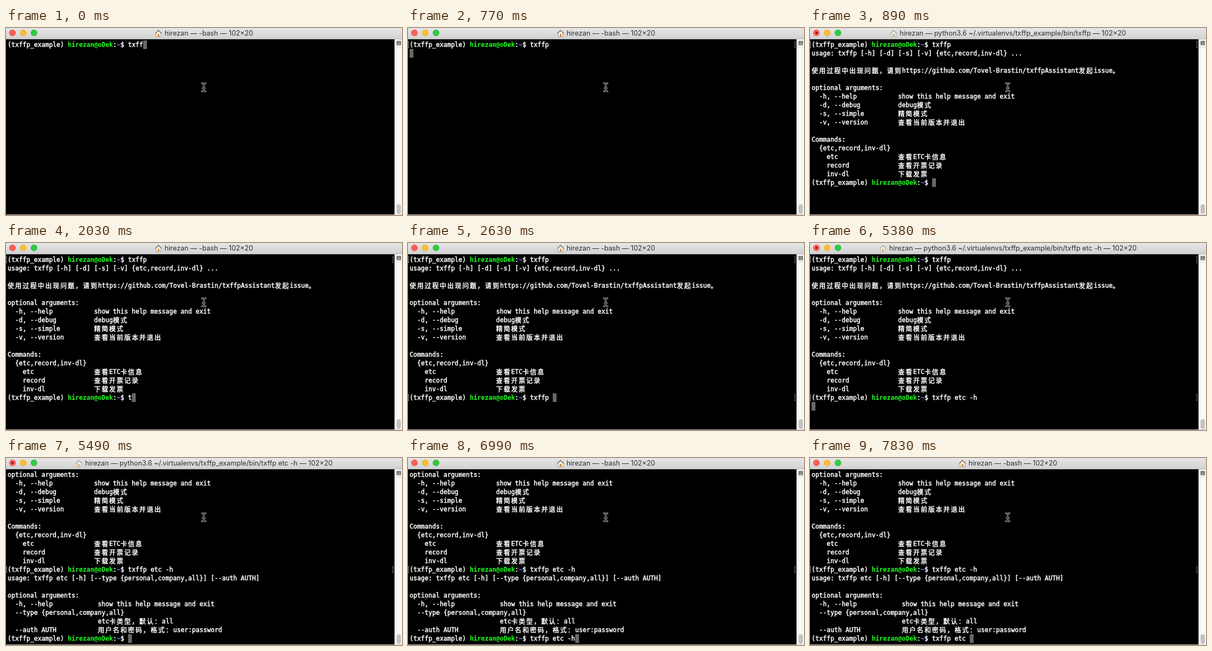
Animation, 736 px wide and 347 px high, one loop 8 s. Source, as an HTML page:

```html
<!DOCTYPE html>
<html lang="en">
<head>
<meta charset="utf-8">
<title>Terminal</title>
<style>
  html, body { margin: 0; width: 100%; height: 100%; overflow: hidden; background: #000; }
  #stage { position: relative; width: 736px; height: 347px; overflow: hidden; background: #000; }
  #stage > * { position: absolute; }
  #bar {
    left: 0; top: 0; width: 736px; height: 21px; box-sizing: border-box;
    background: linear-gradient(#e6e6e6, #d2d2d2); border-bottom: 1px solid #b4b4b4;
    display: flex; justify-content: center; align-items: center;
    font: 12.75px/18px Inter, "Open Sans", sans-serif; color: #303030; white-space: pre;
  }
  #bar svg { margin-right: 5px; }
  #screen {
    left: 0; top: 23px; width: 722px;
    font: 11.627px/16px "DejaVu Sans Mono", monospace; font-variant-ligatures: none;
    color: #fff; -webkit-text-stroke: .5px; white-space: pre;
  }
  .row { position: relative; height: 16px; padding-left: 3px; }
  .row i {
    display: inline-block; width: 14px; height: 16px; vertical-align: top;
    font: 12px/16px "Noto Sans CJK SC", "Noto Sans CJK", sans-serif;
  }
  .row b { color: #20f820; -webkit-text-stroke: .1px; }
  .row b.path { color: #7079ff; }
  .mark::before, .mark::after {
    content: ""; position: absolute; top: 2px; width: 1px; height: 10px; border: 1px solid #8c8c8c;
  }
  .mark::before { left: 0; border-right: 0; }
  .mark::after { left: 718px; border-left: 0; }
  .cursor { display: inline-block; width: 7px; height: 16px; background: #686868; vertical-align: top; }
</style>
</head>
<body>
<div id="stage">
  <div id="bar">
    <svg id="home" width="13" height="14" viewBox="0 0 13 14">
      <path d="M2 6.5 6.5 2 11 6.5V13H2Z" fill="#fbf7ef" stroke="#a39380"/>
      <path d="M.5 7.2 6.5 1.2 12.5 7.2" fill="none" stroke="#8a6a4c" stroke-width="1.4"/>
      <path d="M5 8h3v5H5Z" fill="#d98a35"/>
    </svg><span id="title"></span>
  </div>
  <div id="screen"></div>
  <svg width="736" height="347" viewBox="0 0 736 347">
    <g stroke-width=".6">
      <circle cx="12" cy="9" r="5.8" fill="#fc5f58" stroke="#df4a43"/>
      <circle cx="32" cy="9" r="5.8" fill="#fdbd30" stroke="#dea02f"/>
      <circle cx="52" cy="9" r="5.8" fill="#2fca43" stroke="#25aa35"/>
    </g>
    <circle id="dot" cx="12" cy="9" r="2" fill="#750a06"/>
    <path d="M722 21h14v325h-14Z" fill="#f8f8f8"/>
    <path d="M722.5 21v325M722 35.5h14" stroke="#dcdcdc"/>
    <path d="M726.5 24.5h7v7h-7ZM727 26.5h6M727 28.5h6" fill="#bbb" stroke="#555"/>
    <rect x="726" y="327" width="8" height="18" rx="4" fill="#c3c3c3"/>
    <path d="M0 346.5h736" stroke="#c8c8c8"/>
    <defs>
      <path id="beam" d="M364 102.5q3.5 0 3.5 3q0-3 3.5-3M367.5 105v10M365.5 111.5h4M364 117.5q3.5 0 3.5-3q0 3 3.5 3"/>
    </defs>
    <g fill="none" stroke-linecap="round">
      <use href="#beam" stroke="#ddd" stroke-width="2.6"/>
      <use href="#beam" stroke="#000" stroke-width="1.1"/>
    </g>
  </svg>
</div>
<script>
const LOOP = 8000;
const $ = id => document.getElementById(id);

const row = (html, cls = '') => ({ html, cls });
const text = line => row(line.replace(/[\u3000-\uffef]/g, '<i>$&</i>'));
const prompt = (command = '', marked = false) =>
  row(`(txffp_example) <b>hirezan@oDek</b>:<b class="path">~</b>$ ${command}`, marked ? 'mark' : '');
const option = (name, about, column = 23) => name.padEnd(column) + about;

const mainHelp = [
  'usage: txffp [-h] [-d] [-s] [-v] {etc,record,inv-dl} ...',
  '',
  '使用过程中出现问题，请到https://github.com/Tovel-Brastin/txffpAssistant发起issue。',
  '',
  'optional arguments:',
  option('  -h, --help', 'show this help message and exit'),
  option('  -d, --debug', 'debug模式'),
  option('  -s, --simple', '精简模式'),
  option('  -v, --version', '查看当前版本并退出'),
  '',
  'Commands:',
  '  {etc,record,inv-dl}',
  option('    etc', '查看ETC卡信息'),
  option('    record', '查看开票记录'),
  option('    inv-dl', '下载发票')
].map(text);

const etcHelp = [
  'usage: txffp etc [-h] [--type {personal,company,all}] [--auth AUTH]',
  '',
  'optional arguments:',
  option('  -h, --help', 'show this help message and exit', 24),
  '  --type {personal,company,all}',
  option('', 'etc卡类型，默认：all', 24),
  option('  --auth AUTH', '用户名和密码，格式：user:password', 24)
].map(text);

const firstRun = [prompt('txffp', true)];
const afterFirst = [...firstRun, ...mainHelp];
const secondRun = [...afterFirst, prompt('txffp etc -h', true)];
const afterSecond = [...secondRun, ...etcHelp];
const blank = text('');
const python = 'python3.6 ~/.virtualenvs/txffp_example/bin/txffp';

// Each step: start time, rows above, row holding the cursor, running program
const steps = [
  [0, [], prompt('txff')],
  [120, [], prompt('txffp ', true)],
  [660, firstRun, blank],
  [780, firstRun, blank, python],
  [890, afterFirst, prompt(), python],
  [950, afterFirst, prompt()],
  [2030, afterFirst, prompt('t')],
  [2150, afterFirst, prompt('tx')],
  [2330, afterFirst, prompt('txf')],
  [2510, afterFirst, prompt('txff')],
  [2630, afterFirst, prompt('txffp ', true)],
  [3770, afterFirst, prompt('txffp e', true)],
  [3890, afterFirst, prompt('txffp et', true)],
  [4010, afterFirst, prompt('txffp etc', true)],
  [4550, afterFirst, prompt('txffp etc ', true)],
  [4730, afterFirst, prompt('txffp etc -', true)],
  [4970, afterFirst, prompt('txffp etc -h', true)],
  [5260, secondRun, blank],
  [5380, secondRun, blank, python + ' etc -h'],
  [5490, afterSecond, prompt(), python + ' etc -h'],
  [5550, afterSecond, prompt()],
  [6990, afterSecond, prompt('txffp etc -h')],
  [7830, afterSecond, prompt('txffp etc ')]
];

let shown;
function show(step) {
  if (step === shown) return;
  shown = step;
  const [, above, live, program] = step;
  const current = row(live.html + '<span class="cursor"></span>', live.cls);
  $('screen').innerHTML = [...above, current].slice(-20)
    .map(r => `<div class="row ${r.cls}">${r.html}</div>`).join('');
  $('title').textContent = `hirezan — ${program || '-bash'} — 102×20`;
  $('home').style.opacity = program ? .5 : 1;
  $('dot').style.display = program ? '' : 'none';
}

const start = performance.now();
function tick() {
  const time = (performance.now() - start) % LOOP;
  show(steps.findLast(step => step[0] <= time));
  requestAnimationFrame(tick);
}
tick();
</script>
</body>
</html>
```
